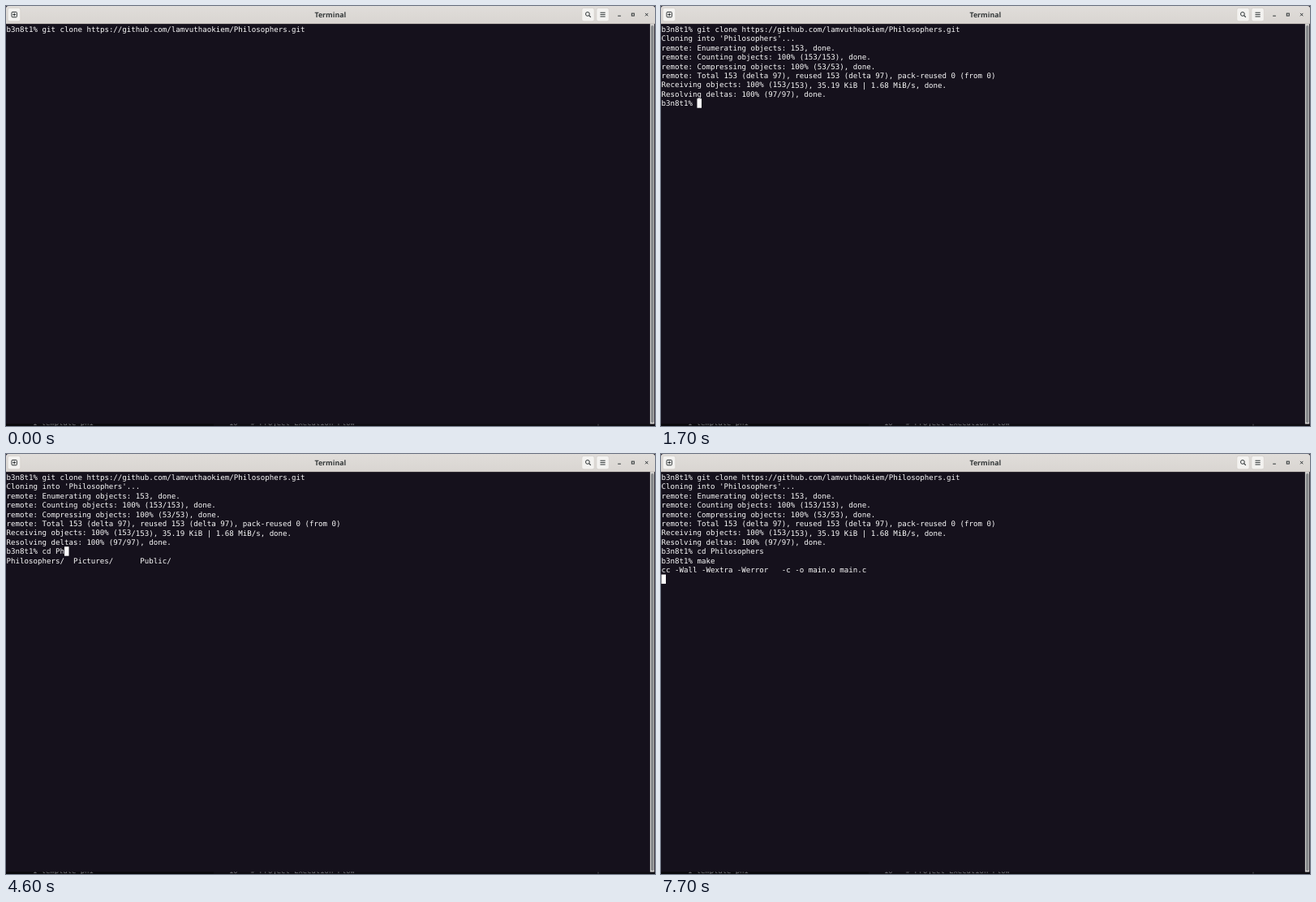
An HTML page for the animation above (8 s loop, 800 px wide and 518 px high).

```html
<!DOCTYPE html>
<html lang="en">
<head>
<meta charset="utf-8">
<title>Terminal</title>
<style>
html, body { margin: 0; width: 100%; height: 100%; overflow: hidden; background: #15111c; }
svg { display: block; }
text { white-space: pre; text-rendering: geometricPrecision; }
.mono { font: 9.136px "DejaVu Sans Mono", monospace; fill: #fafafa; }
.title { font: 700 8.8px "Noto Sans", sans-serif; fill: #35393a; text-anchor: middle; }
.under { font: 8.9px "DejaVu Sans Mono", monospace; fill: #77777c; }
.btn { fill: #f3f2f0; stroke: #d0cbc6; stroke-width: .6; }
.icon { fill: none; stroke: #2e3436; stroke-width: 1; }
</style>
</head>
<body>
<svg width="800" height="518" viewBox="0 0 800 518">
  <defs>
    <linearGradient id="bar" x2="0" y2="1">
      <stop offset="0" stop-color="#e0ddda"/>
      <stop offset="1" stop-color="#d9d5d1"/>
    </linearGradient>
    <clipPath id="strip"><rect y="515.3" width="800" height="2.7"/></clipPath>
  </defs>
  <rect width="800" height="518" fill="#15111c"/>

  <g clip-path="url(#strip)">
    <rect y="515.3" width="800" height="3" fill="#0e0d12"/>
    <rect y="515.3" width="256" height="3" fill="#08080b"/>
    <text class="under" x="33" y="517">1 template_phi</text>
    <text class="under" x="275" y="517">10   # Project Execution Flow</text>
    <rect x="729.5" y="515.5" width="1" height="2" fill="#55555a"/>
  </g>

  <path d="M0 22V3Q0 0 3 0H797Q800 0 800 3V22Z" fill="url(#bar)"/>
  <path d="M0 21.7H800" stroke="#b9b3ad" stroke-width=".6"/>
  <text class="title" x="399.8" y="13.9">Terminal</text>

  <rect class="btn" x="2.2" y="2.4" width="15.6" height="16.4" rx="2.5"/>
  <rect class="btn" x="709.8" y="2.4" width="15.4" height="16.4" rx="2.5"/>
  <rect class="btn" x="727.9" y="2.4" width="15.4" height="16.4" rx="2.5"/>
  <g class="icon">
    <rect x="7" y="7.4" width="6.4" height="6.4" rx="1"/>
    <path d="M8.4 10.6H12M10.2 8.8V12.4"/>
    <circle cx="716.9" cy="9.9" r="2.4"/>
    <path d="M718.7 11.7L720.8 13.8" stroke-width="1.2"/>
    <path d="M732.5 8.2H738.7M732.5 10.6H738.7M732.5 13H738.7"/>
    <path d="M754.2 12.2H757.9"/>
    <rect x="771.3" y="9.1" width="3" height="3"/>
    <path d="M788 8.9L791.4 12.3M791.4 8.9L788 12.3"/>
  </g>

  <rect x="793.9" y="22" width="5.3" height="493.5" fill="#cfcdcb"/>
  <rect x="795" y="24" width="3.4" height="490" rx="1.7" fill="#85888a"/>

  <!-- the tiny turn keeps baselines from snapping to whole pixels -->
  <g id="screen" transform="rotate(.02 150 90)"></g>
  <rect id="cursor" width="5.5" height="11.45" fill="#fff"/>
</svg>
<script>
const LOOP = 8000, CELL = 5.5, ROW = 11.45, LEFT = 0.5, TOP = 22.65, BASE = 31.8;
const PROMPT = "b3n8t1% ";
const FOLDER = "Philosophers";
const CLONE = PROMPT + "git clone https://github.com/lamvuthaokiem/" + FOLDER + ".git";

// [time, text]: output lines, each ends with a line break
const output = [
  [0, CLONE],
  [200, `Cloning into '${FOLDER}'...`],
  [1600, "remote: Enumerating objects: 153, done."],
  [1600, "remote: Counting objects: 100% (153/153), done."],
  [1600, "remote: Compressing objects: 100% (53/53), done."],
  [1700, "remote: Total 153 (delta 97), reused 153 (delta 97), pack-reused 0 (from 0)"],
  [1700, "Receiving objects: 100% (153/153), 35.19 KiB | 1.68 MiB/s, done."],
  [1700, "Resolving deltas: 100% (97/97), done."],
  [5300, PROMPT + "cd " + FOLDER],
  [7700, PROMPT + "make"],
  [7700, "cc -Wall -Wextra -Werror   -c -o main.o main.c"]
];

// [time, text]: content of the line being edited
const input = [
  [0, ""], [1700, PROMPT],
  [2700, PROMPT + "c"], [2800, PROMPT + "cd"], [2900, PROMPT + "cd "], [3100, PROMPT + "cd P"],
  [4600, PROMPT + "cd Ph"], [4700, PROMPT + "cd Phi"], [4900, PROMPT + "cd " + FOLDER + "/"],
  [5300, PROMPT],
  [7100, PROMPT + "m"], [7200, PROMPT + "ma"], [7300, PROMPT + "mak"], [7400, PROMPT + "make"],
  [7700, ""]
];

const matches = { from: 3500, to: 5300, text: FOLDER + "/  Pictures/      Public/" };
const blinks = [[0, 200], [800, 1400], [2000, 2600], [3900, 4500], [5900, 6500]];

const NS = "http://www.w3.org/2000/svg";
const screen = document.getElementById("screen");
const cursor = document.getElementById("cursor");
const within = (t, from, to) => t >= from && t < to;

const rows = Array.from({ length: 12 }, (_, i) => {
  const row = document.createElementNS(NS, "text");
  row.setAttribute("class", "mono");
  row.setAttribute("x", LEFT);
  row.setAttribute("y", BASE + i * ROW);
  return screen.appendChild(row);
});

function draw(t) {
  const lines = output.filter(([at]) => t >= at).map(([, text]) => text);
  const edit = input.filter(([at]) => t >= at).pop()[1];
  cursor.setAttribute("x", LEFT + edit.length * CELL);
  cursor.setAttribute("y", TOP + lines.length * ROW);
  const hidden = blinks.some(([from, to]) => within(t, from, to));
  cursor.setAttribute("visibility", hidden ? "hidden" : "visible");

  lines.push(edit);
  if (within(t, matches.from, matches.to)) lines.push(matches.text);
  rows.forEach((row, i) => {
    const text = lines[i] || "";
    if (row.textContent !== text) row.textContent = text;
  });
}

const start = performance.now();
function tick() {
  draw((performance.now() - start) % LOOP);
  requestAnimationFrame(tick);
}
draw(0);
requestAnimationFrame(tick);
</script>
</body>
</html>
```
